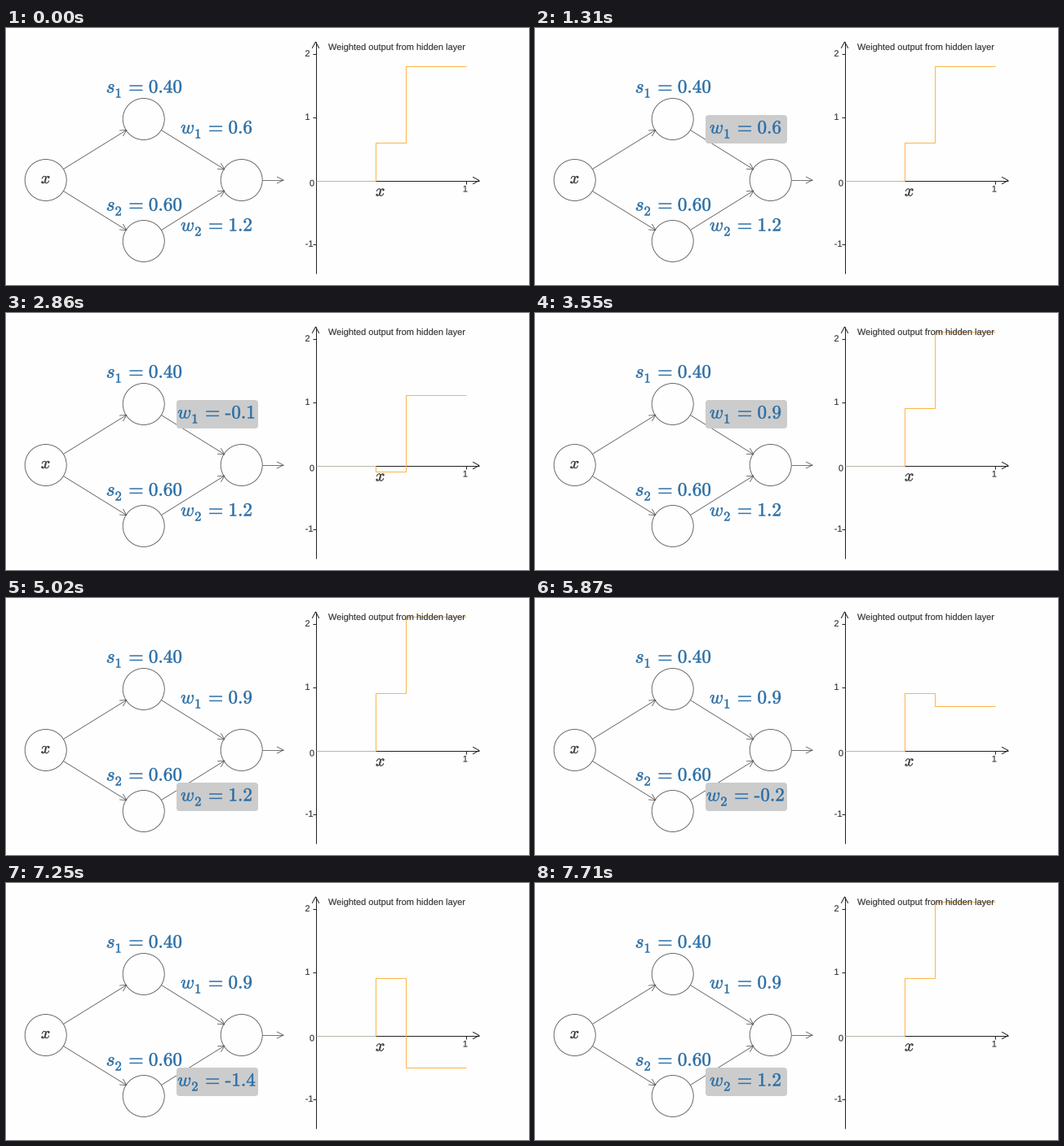
A matplotlib script for the animation above (8 s loop, 641 by 316 pixels).

```python
import math

import matplotlib.pyplot as plt
from matplotlib.animation import FuncAnimation
from matplotlib.patches import Circle, FancyBboxPatch, PathPatch
from matplotlib.path import Path
from matplotlib.textpath import TextPath
from matplotlib.transforms import Affine2D

plt.rcParams["mathtext.fontset"] = "cm"

WIDTH, HEIGHT, DPI = 641, 316, 100
INTERVAL, LOOP = 20, 8000
PX = 72 / DPI
BLUE, LINE, INK = "#2a6ea6", "#555555", "#333333"
ORANGE, FAINT, AXIS = "#fdb44b", "#b8b4ac", "#222222"
HOVER, PRESSED = "#e0e0e0", "#cccccc"

# (first change, last change, number of steps, value reached)
W1_DRAG = [(1480, 1860, 6, -0.2), (2090, 2090, 1, -0.3), (2640, 2640, 1, -0.4),
           (2710, 2860, 3, -0.1), (3090, 3550, 7, 0.9)]
W2_DRAG = [(5250, 5640, 6, 0.2), (5790, 6560, 11, -1.8),
           (6640, 6710, 2, -2.3), (7170, 7710, 8, 1.2)]

fig = plt.figure(figsize=(WIDTH / DPI, HEIGHT / DPI), dpi=DPI, facecolor="#fefefe")
ax = fig.add_axes([0, 0, 1, 1])
ax.set_xlim(0, WIDTH)
ax.set_ylim(HEIGHT, 0)
ax.axis("off")


def line(points, color=LINE, width=0.8, z=2):
    xs, ys = zip(*points)
    return ax.plot(xs, ys, color=color, lw=width * PX, zorder=z,
                   solid_capstyle="butt", solid_joinstyle="miter")[0]


def arrow(start, tip, color=LINE, width=0.8, head=9, spread=0.47):
    line([start, tip], color, width)
    angle = math.atan2(start[1] - tip[1], start[0] - tip[0])
    barbs = [(tip[0] + head * math.cos(angle + s), tip[1] + head * math.sin(angle + s))
             for s in (spread, -spread)]
    line([barbs[0], tip, barbs[1]], color, width)


def shape(path, color, stroke=0.0, z=5):
    patch = PathPatch(path, facecolor=color, edgecolor=color, lw=stroke * PX, zorder=z)
    ax.add_patch(patch)
    return patch


def sans(text, x, y, align=0.5, size=11):
    """Plain label; y is the middle of the capitals."""
    path = TextPath((0, 0), text, size=size, prop={"family": "Liberation Sans"})
    box = path.get_extents()
    place = Affine2D().translate(-box.x0 - align * box.width, -0.36 * size)
    shape(path.transformed(place.scale(1, -1).translate(x, y)), INK, 0.15)


def bar(x0, x1, y0, y1):
    return Path.unit_rectangle().transformed(Affine2D().scale(x1 - x0, y1 - y0).translate(x0, y0))


# Glyphs in units of one em, with their advance widths
GLYPHS = {c: TextPath((0, 0), f"${c}$", size=1) for c in "swx0123456789."}
GLYPHS["-"] = bar(0.011, 0.276, 0.187, 0.245)
GLYPHS["="] = Path.make_compound_path(bar(0.056, 0.722, 0.113, 0.153),
                                      bar(0.056, 0.722, 0.347, 0.387))
ADVANCE = {"s": 0.469, "w": 0.743, "x": 0.572, ".": 0.278, "-": 0.333, "=": 0.778}
EM = 23.1


def equation(name, index, number, center, baseline):
    parts, x = [], 0.0

    def put(char, scale=1.0, drop=0.0):
        nonlocal x
        move = Affine2D().scale(scale).translate(x, -drop)
        parts.append(GLYPHS[char].transformed(move))
        x += ADVANCE.get(char, 0.5) * scale

    put(name)
    put(index, 0.707, 0.26)
    x += 0.1 + 0.278
    put("=")
    x += 0.278
    for char in number:
        put(char)
    place = Affine2D().translate(-x / 2, 0).scale(EM, -EM).translate(center, baseline)
    return Path.make_compound_path(*parts).transformed(place)


def variable(x, baseline, size=20):
    place = Affine2D().translate(-0.286, 0).scale(size, -size).translate(x, baseline)
    shape(GLYPHS["x"].transformed(place), INK, 0.4)


def highlight(top):
    box = FancyBboxPatch((209, top), 100, 35, boxstyle="round,pad=0,rounding_size=4",
                         lw=0, facecolor=PRESSED, zorder=4)
    ax.add_patch(box)
    return box


# Network
for cx, cy in [(48.7, 187), (168.7, 112), (168.7, 262), (288.7, 187)]:
    ax.add_patch(Circle((cx, cy), 25.5, facecolor="none", edgecolor=LINE,
                        lw=0.85 * PX, zorder=2))
arrow((70.3, 173.5), (148, 125.3))
arrow((70.3, 200.5), (148, 248.7))
arrow((190.3, 125.5), (268, 174))
arrow((190.3, 248.5), (268, 200))
arrow((314.2, 187), (340, 187))
variable(48.5, 191)
shape(equation("s", "1", "0.40", 169.3, 79.5), BLUE, 0.5)
shape(equation("s", "2", "0.60", 169.3, 224.5), BLUE, 0.5)

# Graph
X0, Y0, X_UNIT, Y_UNIT = 379.5, 187.5, 184, 78.2
arrow((X0, 301.5), (X0, 17), AXIS, 1, 9, 0.5)
arrow((X0, Y0), (580, Y0), AXIS, 1, 9, 0.5)
for value, y in [("2", 31), ("1", 109), ("-1", 265)]:
    line([(375.5, y + 0.5), (X0, y + 0.5)], AXIS, 1)
    sans(value, 376 if value == "-1" else 372, y, 1)
line([(563.5, Y0), (563.5, 191.5)], AXIS, 1)
sans("0", 375, 190.5)
sans("1", 563, 197.5)
sans("Weighted output from hidden layer", 395, 23, 0)
variable(458.7, 206.5)
STEP1, STEP2, END = (X0 + X_UNIT * s for s in (0.4, 0.6, 1))
line([(X0, Y0), (STEP1, Y0)], FAINT, 1, 3)
steps = line([(STEP1, Y0), (END, Y0)], ORANGE, 1, 3)

box1, box2 = highlight(107), highlight(227)
label1 = shape(equation("w", "1", "0.6", 258, 129.5), BLUE, 0.5)
label2 = shape(equation("w", "2", "1.2", 258, 249.5), BLUE, 0.5)


def dragged(t, value, drags):
    for first, last, count, goal in drags:
        if t < first:
            break
        gap = (last - first) / max(count - 1, 1)
        done = count if t >= last else 1 + int((t - first) / gap)
        value += (goal - value) * done / count
    return round(value, 1) + 0.0


def update(frame):
    t = frame * INTERVAL + INTERVAL / 2
    w1, w2 = dragged(t, 0.6, W1_DRAG), dragged(t, 1.2, W2_DRAG)

    box1.set_visible(610 <= t < 4330)
    box1.set_facecolor(HOVER if t < 1310 else PRESSED)
    box2.set_visible(t >= 4640)
    box2.set_facecolor(HOVER if t < 5020 else PRESSED)

    label1.set_path(equation("w", "1", f"{w1:.1f}", 258, 129.5))
    label2.set_path(equation("w", "2", f"{w2:.1f}", 258, 249.5))

    low, high = Y0 - Y_UNIT * w1, Y0 - Y_UNIT * (w1 + w2)
    steps.set_data([STEP1, STEP1, STEP2, STEP2, END], [Y0, low, low, high, high])
    return box1, box2, label1, label2, steps


anim = FuncAnimation(fig, update, frames=LOOP // INTERVAL, interval=INTERVAL,
                     repeat=True, repeat_delay=0, blit=False)
plt.show()
```
